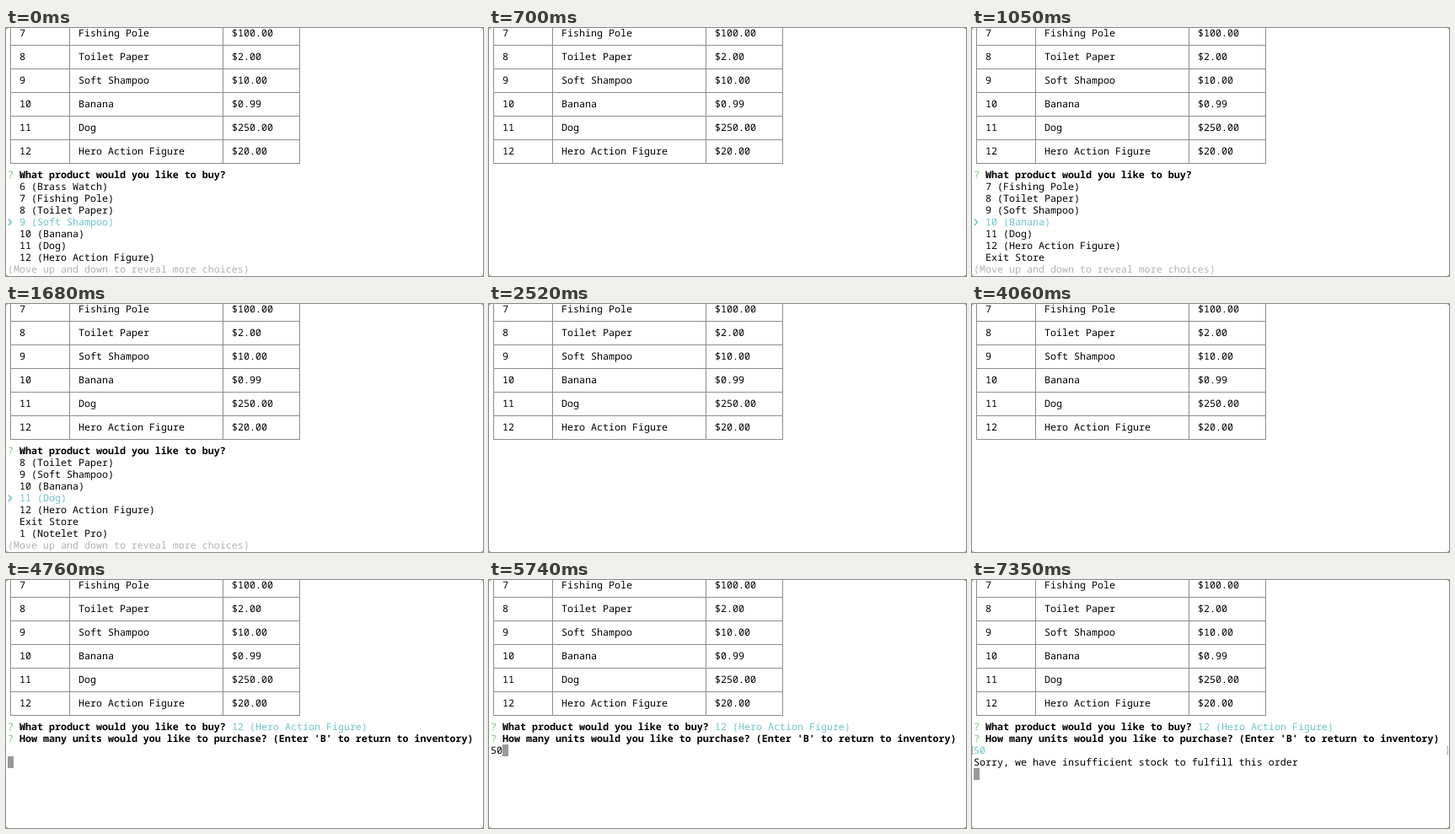
These frames come from a looping animation (566 px wide and 294 px high, 8 s). An HTML page:

```html
<!DOCTYPE html>
<html lang="en">
<head>
<meta charset="utf-8">
<title>Store prompt</title>
<style>
  html, body { margin: 0; width: 100%; height: 100%; overflow: hidden; background: #858585; }
  svg { display: block; width: 566px; height: 294px; background: #fff; border-radius: 3px; }
  text {
    font: 500 11.6667px "Noto Sans Mono", "DejaVu Sans Mono", monospace;
    white-space: pre;
    text-rendering: geometricPrecision;
  }
  .bold { font-weight: 700; }
  .cyan { fill: #6cc5ca; }
  .green { fill: #72bf72; }
  .dim { fill: #b2b2b2; }
  .grid { stroke: #8c8c8c; fill: none; }

  .pick, .scroll, .ask, .cursor, .typed, .zero, .done {
    animation: 8s step-end infinite;
  }
  .pick { animation-name: pick; }
  .scroll { animation-name: scroll; }
  .ask { animation-name: ask; }
  .cursor { animation-name: cursor; }
  .typed { animation-name: typed; }
  .zero { animation-name: zero; }
  .done { animation-name: done; }

  /* The prompt blanks for 70 ms on some redraws. */
  @keyframes pick {
    0%, 9.625%, 32.375% { opacity: 1; }
    8.75%, 31.5%, 50.75%, 100% { opacity: 0; }
  }
  @keyframes scroll {
    0% { transform: translateY(0); }
    9.625% { transform: translateY(-14px); }
    17.5% { transform: translateY(-28px); }
    32.375%, 100% { transform: translateY(-42px); }
  }
  @keyframes ask {
    0% { opacity: 0; }
    51.625%, 100% { opacity: 1; }
  }
  @keyframes cursor {
    0% { transform: translate(0, 14px); }
    68.25% { transform: translate(7px, 0); }
    71.75% { transform: translate(14px, 0); }
    81.375%, 100% { transform: translate(0, 28px); }
  }
  @keyframes typed {
    0% { opacity: 0; fill: #000; }
    68.25% { opacity: 1; fill: #000; }
    81.375%, 100% { opacity: 1; fill: #6cc5ca; }
  }
  @keyframes zero {
    0% { opacity: 0; }
    71.75%, 100% { opacity: 1; }
  }
  @keyframes done {
    0% { opacity: 0; }
    81.375%, 100% { opacity: 1; }
  }
</style>
</head>
<body>
<svg viewBox="0 0 566 294">
  <defs>
    <g id="question">
      <text class="green" x="2" y="178">?</text>
      <text class="bold" x="16" y="178">What product would you like to buy?</text>
    </g>
    <g id="items">
      <text x="16" y="192">6 (Brass Watch)</text>
      <text x="16" y="206">7 (Fishing Pole)</text>
      <text x="16" y="220">8 (Toilet Paper)</text>
      <text x="16" y="234">9 (Soft Shampoo)</text>
      <text x="16" y="248">10 (Banana)</text>
      <text x="16" y="262">11 (Dog)</text>
      <text x="16" y="276">12 (Hero Action Figure)</text>
      <text x="16" y="290">Exit Store</text>
      <text x="16" y="304">1 (Notelet Pro)</text>
      <text x="16" y="318">2 (Blue Jeans)</text>
    </g>
    <clipPath id="others">
      <rect y="181" width="566" height="42"/>
      <rect y="237" width="566" height="42"/>
    </clipPath>
    <clipPath id="chosen"><rect y="223" width="566" height="14"/></clipPath>
  </defs>

  <path class="grid" d="M5.5 0V161M75.5 0V160M257.5 0V160M348.5 0V161
    M5 20.5H349M5 48.5H349M5 76.5H349M5 104.5H349M5 132.5H349M5 160.5H349"/>
  <g>
    <text x="16" y="10">7</text><text x="86" y="10">Fishing Pole</text><text x="268" y="10">$100.00</text>
    <text x="16" y="38">8</text><text x="86" y="38">Toilet Paper</text><text x="268" y="38">$2.00</text>
    <text x="16" y="66">9</text><text x="86" y="66">Soft Shampoo</text><text x="268" y="66">$10.00</text>
    <text x="16" y="94">10</text><text x="86" y="94">Banana</text><text x="268" y="94">$0.99</text>
    <text x="16" y="122">11</text><text x="86" y="122">Dog</text><text x="268" y="122">$250.00</text>
    <text x="16" y="150">12</text><text x="86" y="150">Hero Action Figure</text><text x="268" y="150">$20.00</text>
  </g>

  <g class="pick">
    <use href="#question"/>
    <g clip-path="url(#others)"><g class="scroll"><use href="#items"/></g></g>
    <g clip-path="url(#chosen)"><g class="scroll cyan"><use href="#items"/></g></g>
    <path d="M3 226.5L6.3 230.3L3 234" fill="none" stroke="#6cc5ca" stroke-width="1.7"/>
    <text class="dim" x="2" y="290">(Move up and down to reveal more choices)</text>
  </g>

  <g class="ask">
    <use href="#question"/>
    <text class="cyan" x="268" y="178">12 (Hero Action Figure)</text>
    <text class="green" x="2" y="192">?</text>
    <text class="bold" x="16" y="192">How many units would you like to purchase? (Enter 'B' to return to inventory)</text>
    <rect class="cursor" x="2" y="195" width="7" height="14" fill="#999"/>
    <g class="typed">
      <text x="2" y="206">5</text>
      <text class="zero" x="9" y="206">0</text>
    </g>
    <g class="done">
      <path d="M2 197.5H.5V206.5H2M563 197.5H564.5V206.5H563" fill="none" stroke="#b0b0b0"/>
      <text x="2" y="220">Sorry, we have insufficient stock to fulfill this order</text>
    </g>
  </g>
</svg>
</body>
</html>
```
